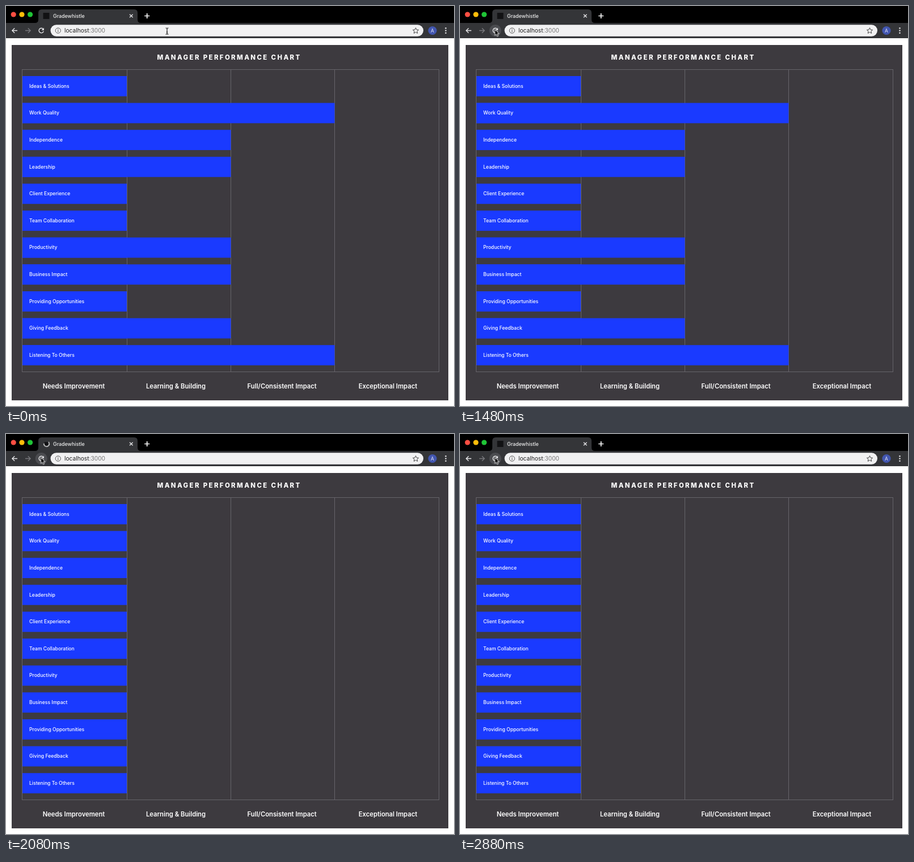
An HTML page for the animation above (2.92 s loop, 790x708 px).

```html
<!DOCTYPE html>
<html lang="en">
<head>
<meta charset="utf-8">
<title>Manager Performance Chart</title>
<style>
  html, body { margin: 0; width: 100%; height: 100%; overflow: hidden; background: #fff; }
  svg { display: block; width: 790px; height: 708px; }
  text { font-family: Inter, "Liberation Sans", sans-serif; fill: #fff; }
  .label { font-size: 8.6px; font-weight: 500; }
  .level { font-size: 11.25px; font-weight: 600; text-anchor: middle; }
  .title { font-size: 11.4px; font-weight: 800; letter-spacing: 2.4px; }
  .tab { font-size: 8.9px; font-weight: 500; fill: #eee; }
  .url { font-size: 10.2px; fill: #222; }
  .port { fill: #777; }
  .avatar { font-size: 8.5px; text-anchor: middle; fill: #e3e6f8; }
  .bar { fill: #1a3aff; }
  .grid { fill: none; stroke: #66646a; shape-rendering: crispEdges; }
  .line { fill: none; stroke: #e4e4e6; stroke-width: 1.4; }

  .ext, .spinner, .icon, .hover, .beam, .arrow { animation: 2920ms step-end infinite; }
  .ext { animation-name: reset; }
  .spinner { animation-name: loading; }
  .icon { animation-name: shrink; transform-origin: 71px 17.5px; }
  .hover { animation-name: hover; }
  .beam { animation-name: beam; }
  .arrow { animation-name: arrow; }
  .cursor { animation: move 2920ms linear infinite; }
  .arc { animation: spin 2920ms linear infinite; transform-origin: 71.5px 17.3px; }

  /* page reloads with every score back in the first column at 1920 ms */
  @keyframes reset { 0% { opacity: 1 } 65.753%, 100% { opacity: 0 } }
  @keyframes loading { 0% { opacity: 0 } 56.164% { opacity: 1 } 75.342%, 100% { opacity: 0 } }
  @keyframes shrink { 0% { transform: none } 56.164% { transform: scale(.6) } 75.342%, 100% { transform: none } }
  @keyframes hover { 0% { opacity: 0 } 15.75%, 100% { opacity: 1 } }
  @keyframes beam { 0% { opacity: 1 } 13.1%, 100% { opacity: 0 } }
  @keyframes arrow { 0% { opacity: 0 } 13.1%, 100% { opacity: 1 } }
  @keyframes move {
    0% { transform: translate(284px, 44.5px); animation-timing-function: ease-in-out }
    18.49%, 100% { transform: translate(61.5px, 41.5px) }
  }
  @keyframes spin {
    0%, 56.164% { transform: rotate(-120deg); stroke-dasharray: 5 360 }
    64.384% { transform: rotate(-80deg); stroke-dasharray: 160 360 }
    75.342%, 100% { transform: rotate(-20deg); stroke-dasharray: 270 360 }
  }
</style>
</head>
<body>
<svg viewBox="0 0 790 708" xmlns="http://www.w3.org/2000/svg">
  <!-- browser window -->
  <rect width="790" height="31" fill="#000"/>
  <rect y="30" width="790" height="27" fill="#343538"/>
  <path d="M51 30Q57 30 57 24V12Q57 6 63 6H226Q232 6 232 12V24Q232 30 238 30Z" fill="#343538"/>
  <circle cx="13.2" cy="15" r="4.6" fill="#ff4f43"/>
  <circle cx="28" cy="15" r="4.6" fill="#ffbd0a"/>
  <circle cx="42.6" cy="15" r="4.6" fill="#1fc436"/>
  <rect class="icon" x="65.5" y="12" width="11" height="11" fill="#121214"/>
  <g class="spinner">
    <circle class="arc" cx="71.5" cy="17.3" r="4.8" pathLength="360" fill="none" stroke="#f4f4f4" stroke-width="1.4"/>
  </g>
  <text class="tab" x="83" y="20.6">Gradewhistle</text>
  <path class="line" d="M218 14.7l5.6 5.6m0-5.6l-5.6 5.6"/>
  <path class="line" stroke-width="1.7" d="M244.2 17.5h9M248.7 13v9" style="stroke:#fff;stroke-width:1.7"/>

  <path class="line" d="M20 43.5H11M15.2 39.2L10.9 43.5L15.2 47.8"/>
  <path class="line" d="M34 43.5H43M38.8 39.2L43.1 43.5L38.8 47.8" style="stroke:#77787c"/>
  <circle class="hover" cx="62.3" cy="43.6" r="10.6" fill="#4b4c50"/>
  <path class="line" d="M65.3 40.5A4.2 4.2 0 1 0 66.3 44.7"/>
  <path d="M66.9 38.6V42.9H62.6Z" fill="#e4e4e6"/>

  <rect x="78.5" y="33.3" width="657.5" height="20.4" rx="10.2" fill="#f1f1f2"/>
  <circle cx="91.8" cy="43.5" r="4.6" fill="none" stroke="#555" stroke-width="1"/>
  <path d="M91.8 42.8V46M91.8 40.8V41.9" stroke="#555" stroke-width="1.1"/>
  <text class="url" x="103" y="47.1">localhost<tspan class="port">:3000</tspan></text>
  <path d="M722.5 38.6l1.5 3.3 3.6.4-2.7 2.4.8 3.6-3.2-1.9-3.2 1.9.8-3.6-2.7-2.4 3.6-.4Z" fill="none" stroke="#444" stroke-width="1"/>
  <circle cx="752" cy="43.5" r="7.6" fill="#4256b0"/>
  <text class="avatar" x="752" y="46.6">A</text>
  <g fill="#e4e4e6">
    <circle cx="775.5" cy="39.3" r="1.3"/>
    <circle cx="775.5" cy="43.5" r="1.3"/>
    <circle cx="775.5" cy="47.7" r="1.3"/>
  </g>

  <!-- page -->
  <rect x="10" y="69" width="770" height="629" fill="#3d3a3f"/>
  <text class="title" x="266.5" y="94.7">MANAGER PERFORMANCE CHART</text>
  <path class="grid" d="M28.5 112.5H763.5V647.5H28.5ZM213.5 112V647M396.5 112V647M579.5 112V647"/>
  <g id="chart"></g>

  <g class="cursor">
    <path class="beam" d="M-2.5 -5.5Q0 -5.5 0 -4Q0 -5.5 2.5 -5.5M0 -4V4M-2.5 5.5Q0 5.5 0 4Q0 5.5 2.5 5.5M-1.3 1.8H1.3" fill="none" stroke="#111" stroke-width="1.1"/>
    <path class="arrow" d="M0 0V10.6L2.4 8.4L4.1 12.3L6 11.5L4.3 7.7H7.6Z" fill="#000" stroke="#fff" stroke-width=".9" stroke-linejoin="round"/>
  </g>
</svg>
<script>
  const chart = document.getElementById("chart");
  const edges = [29, 213, 396.5, 579.5];
  const scores = [
    ["Ideas & Solutions", 1], ["Work Quality", 3], ["Independence", 2],
    ["Leadership", 2], ["Client Experience", 1], ["Team Collaboration", 1],
    ["Productivity", 2], ["Business Impact", 2], ["Providing Opportunities", 1],
    ["Giving Feedback", 2], ["Listening To Others", 3]
  ];
  const levels = [
    ["Needs Improvement", 119.5], ["Learning & Building", 299.5],
    ["Full/Consistent Impact", 486.7], ["Exceptional Impact", 673.5]
  ];

  function add(tag, attrs, text = "") {
    const el = document.createElementNS("http://www.w3.org/2000/svg", tag);
    for (const key in attrs) el.setAttribute(key, attrs[key]);
    el.textContent = text;
    chart.append(el);
  }

  function bar(y, end, cls) {
    add("rect", { class: cls, x: edges[0], y, width: edges[end] - edges[0], height: 35.8 });
  }

  scores.forEach(([name, score], i) => {
    const y = 124 + 47.62 * i;
    bar(y, 1, "bar");
    if (score > 1) bar(y, score, "bar ext");
    add("text", { class: "label", x: 41, y: y + 20.7 }, name);
  });
  levels.forEach(([name, x]) => add("text", { class: "level", x, y: 676.7 }, name));
</script>
</body>
</html>
```
